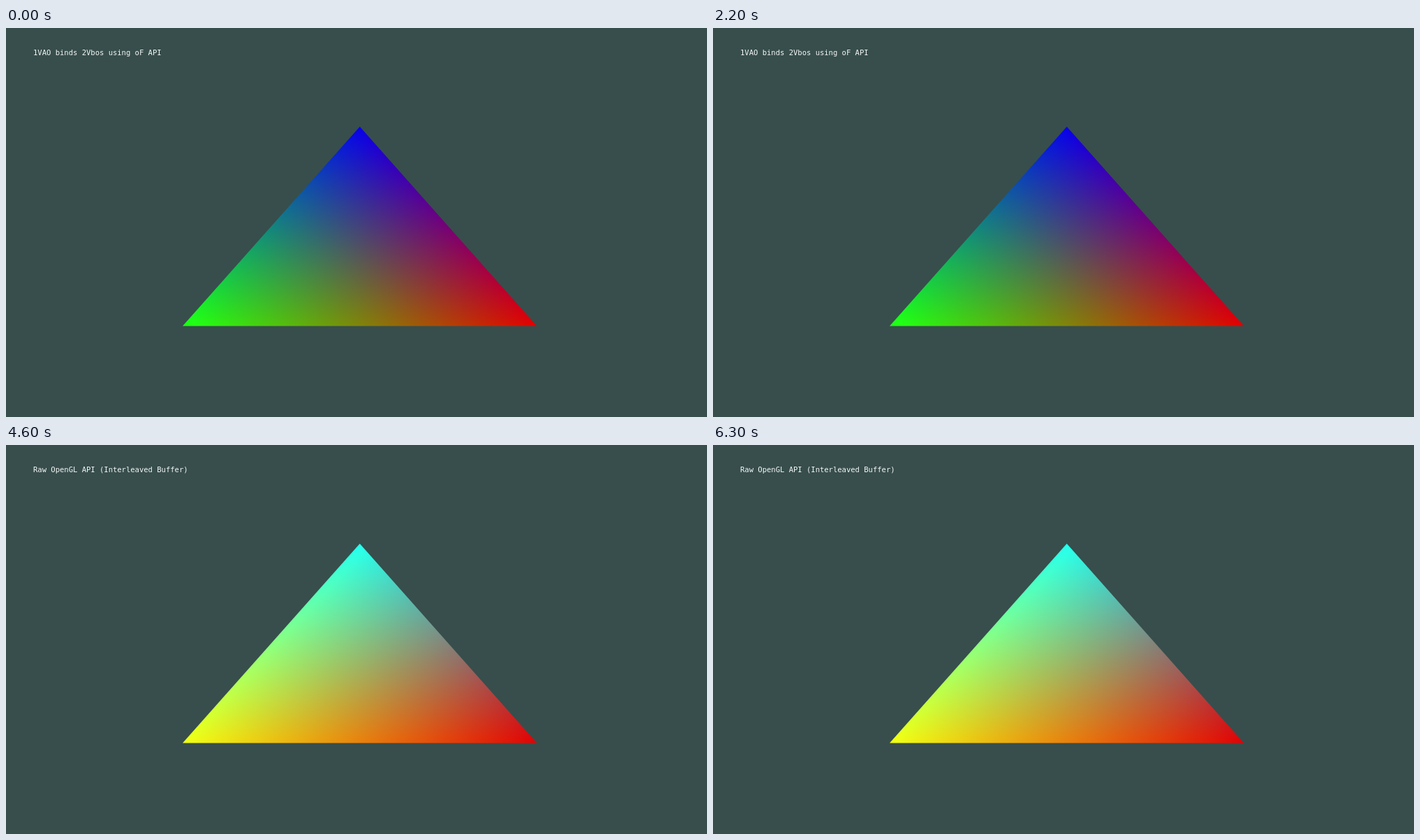
These frames come from a looping animation (1004 by 558 pixels, 6400 ms). An HTML page with a canvas:

```html
<!DOCTYPE html>
<html lang="en">
<head>
<meta charset="utf-8">
<title>Triangle buffers</title>
<style>
  html, body { margin: 0; width: 100%; height: 100%; overflow: hidden; background: #374e4c; }
  canvas, svg { position: absolute; left: 0; top: 0; }
  text { font: 10.52px "DejaVu Sans Mono", "Noto Sans Mono", monospace; fill: #f4f7f6; white-space: pre; }
</style>
</head>
<body>
<canvas id="stage" width="1004" height="558"></canvas>
<svg width="1004" height="558" viewBox="0 0 1004 558"><text id="label" x="39" y="39"></text></svg>
<script>
const W = 1004, H = 558, LOOP = 6400;
const TOP = [506.7, 141.5], LEFT = [253, 427.5], RIGHT = [760.3, 427.5];

// Vertex colours in the order top, left, right
const scenes = [
  { label: "1VAO binds 2Vbos using oF API",
    colors: [[8, 0, 235], [28, 265, 18], [228, 0, 0]] },
  { label: "Raw OpenGL API (Interleaved Buffer)",
    colors: [[36, 262, 240], [242, 258, 18], [226, 0, 4]] }
];

// Spans of the loop, in ms, that show the second scene
const spans = [[2400, 2700], [3300, 3700], [4400, 4700], [5400, 5600], [6200, LOOP]];

const ctx = document.getElementById("stage").getContext("2d");
const label = document.getElementById("label");

// Interpolates the vertex colours across the plane of the triangle
function shade(colors) {
  const canvas = document.createElement("canvas");
  canvas.width = W;
  canvas.height = H;
  const c = canvas.getContext("2d");
  const image = c.createImageData(W, H);
  for (let y = 0, i = 0; y < H; y++) {
    const top = (LEFT[1] - y - 0.5) / (LEFT[1] - TOP[1]);
    for (let x = 0; x < W; x++, i += 4) {
      const right = (x + 0.5 - LEFT[0] - top * (TOP[0] - LEFT[0])) / (RIGHT[0] - LEFT[0]);
      const left = 1 - top - right;
      for (let k = 0; k < 3; k++) {
        image.data[i + k] = top * colors[0][k] + left * colors[1][k] + right * colors[2][k];
      }
      image.data[i + 3] = 255;
    }
  }
  c.putImageData(image, 0, 0);
  return ctx.createPattern(canvas, "no-repeat");
}

for (const scene of scenes) scene.fill = shade(scene.colors);

function show(scene) {
  ctx.clearRect(0, 0, W, H);
  ctx.beginPath();
  ctx.moveTo(...TOP);
  ctx.lineTo(...LEFT);
  ctx.lineTo(...RIGHT);
  ctx.closePath();
  ctx.fillStyle = scene.fill;
  ctx.fill();
  label.textContent = scene.label;
}

let current = null;
function update(t) {
  const scene = scenes[spans.some(([from, to]) => t >= from && t < to) ? 1 : 0];
  if (scene !== current) show(current = scene);
}

const start = performance.now();
function tick() {
  update((performance.now() - start) % LOOP);
  requestAnimationFrame(tick);
}
tick();
</script>
</body>
</html>
```
